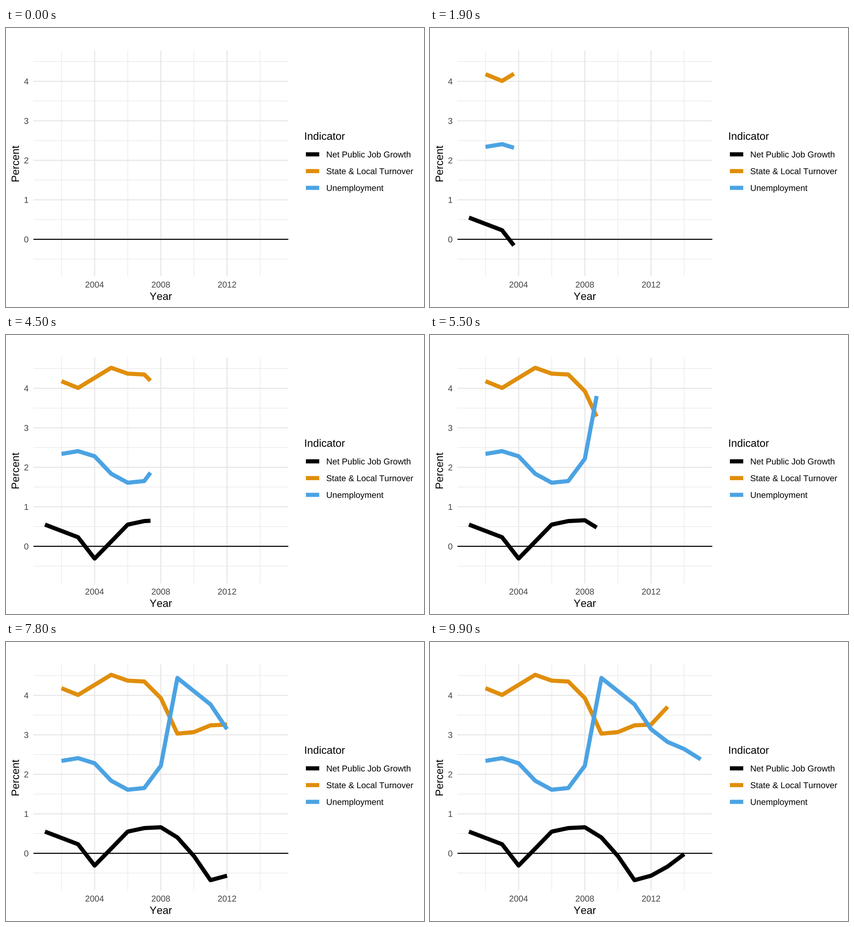
Animation, 917 px wide and 611 px high, one loop 10 s. Source, as a matplotlib script:

```python
import matplotlib.pyplot as plt
import numpy as np
from matplotlib.animation import FuncAnimation
from matplotlib.patches import PathPatch
from matplotlib.textpath import TextPath
from matplotlib.transforms import Affine2D

W, H, DPI = 917, 611, 64
PT = 72 / DPI                      # points per pixel
FRAMES, INTERVAL = 100, 100
FIRST, LAST = 2001, 2015
LEFT, RIGHT, TOP, BOTTOM = 60.2, 619.3, 49.4, 544
THIN, RULE, THICK = 1.13, 2.27, 9.06
SMALL, BIG = 18.68, 23.35
GRID, TICK = "#e6e6e6", "#424242"
BLACK, ORANGE, BLUE = "#000000", "#e08e0b", "#4ba3e3"

plt.rcParams.update({"font.family": "Liberation Sans", "text.kerning_factor": 6})
fig = plt.figure(figsize=(W / DPI, H / DPI), dpi=DPI, facecolor="white")
ax = fig.add_axes([0, 0, 1, 1])
ax.set(xlim=(0, W), ylim=(H, 0))
ax.axis("off")


def yearly(*keys):
    """Turn (year, value, power) keys into one value per year.

    Each stretch runs to its key as progress ** power; 1 is a straight line.
    """
    start, level, _ = keys[0]
    values = [level]
    for year, value, power in keys[1:]:
        p = np.arange(1, year - start + 1) / (year - start)
        values.extend(level + (value - level) * p ** power)
        start, level = year, value
    return keys[0][0] + np.arange(len(values)), np.array(values)


def px(year):
    return 85.5 + (np.asarray(year) - FIRST) * 36.31


def py(value):
    return 462.8 - np.asarray(value) * 86.5


def stroke(x, y, color, width, z):
    line, = ax.plot(x, y, color=color, lw=width * PT, zorder=z, snap=False,
                    solid_capstyle="butt", solid_joinstyle="round")
    return line


def hline(value, color, width, z):
    stroke([LEFT, RIGHT], [py(value)] * 2, color, width, z)


def vline(year, width, z):
    stroke([px(year)] * 2, [TOP, BOTTOM], GRID, width, z)


def label(x, y, text, size=SMALL, color="black", center=False, angle=0):
    path = TextPath((0, 0), text, size=size)
    box = path.get_extents()
    shift = (box.x0 + box.x1) / 2 if center else 0
    place = Affine2D().translate(-shift, 0).scale(1, -1).rotate_deg(-angle)
    ax.add_patch(PathPatch(path.transformed(place.translate(x, y)),
                           fc=color, lw=0, snap=False))


for value in np.arange(-.5, 5):
    hline(value, GRID, THIN, 1)
for year in range(2002, 2015, 4):
    vline(year, THIN, 1)
for value in range(5):
    hline(value, GRID, RULE, 2)
    label(39.3, py(value) + 6.7, str(value), color=TICK)
for year in range(2004, 2013, 4):
    vline(year, RULE, 2)
    label(px(year), 568.4, str(year), color=TICK, center=True)
hline(0, "black", RULE, 3)

label(339.7, 595.4, "Year", BIG, center=True)
label(28.4, 296.8, "Percent", BIG, center=True, angle=90)
label(654.2, 244.8, "Indicator", BIG)

growth = yearly((2001, .55, 1), (2003, .23, 1), (2004, -.31, 1), (2006, .55, 1),
                (2008, .66, .3), (2011, -.68, 1.5), (2014, -.02, 1.6))
turnover = yearly((2002, 4.18, 1), (2003, 4.01, 1), (2005, 4.52, 1), (2007, 4.35, .2),
                  (2009, 3.03, 1.65), (2011, 3.24, 2.4), (2013, 3.71, 4.6), (2014, 3.78, 1))
jobless = yearly((2002, 2.34, 1), (2003, 2.41, 1), (2004, 2.28, 1), (2006, 1.61, .6),
                 (2009, 4.44, 3.8), (2011, 3.77, 1), (2013, 2.82, .6), (2015, 2.38, 1.3))

# name, colour, data, whether the last stretch stays once it is complete
SERIES = [("Net Public Job Growth", BLACK, growth, True),
          ("State & Local Turnover", ORANGE, turnover, False),
          ("Unemployment", BLUE, jobless, True)]

lines = []
for i, (name, color, _, _) in enumerate(SERIES):
    y = 276.7 + 36.68 * i
    stroke([657.9, 687.2], [y, y], color, THICK, 4)
    label(702.5, y + 6.7, name)
    lines.append(stroke([], [], color, THICK, 5 + i))

# each year is reached on a whole frame
YEARS = np.arange(FIRST, LAST + 1)
KEYS = np.rint((YEARS - FIRST) * (FRAMES - 1) / (LAST - FIRST))


def update(frame):
    now = np.interp(frame, KEYS, YEARS)
    for line, (_, _, (years, values), stays) in zip(lines, SERIES):
        end = years[-1] if stays or now < years[-1] else years[-2]
        head = min(now, end)
        xs = np.append(years[years < head], head)
        if len(xs) < 2:
            xs = np.array([])
        line.set_data(px(xs), py(np.interp(xs, years, values)))
    return lines


anim = FuncAnimation(fig, update, frames=FRAMES, interval=INTERVAL,
                     repeat=True, repeat_delay=0, blit=False)
plt.show()
```
